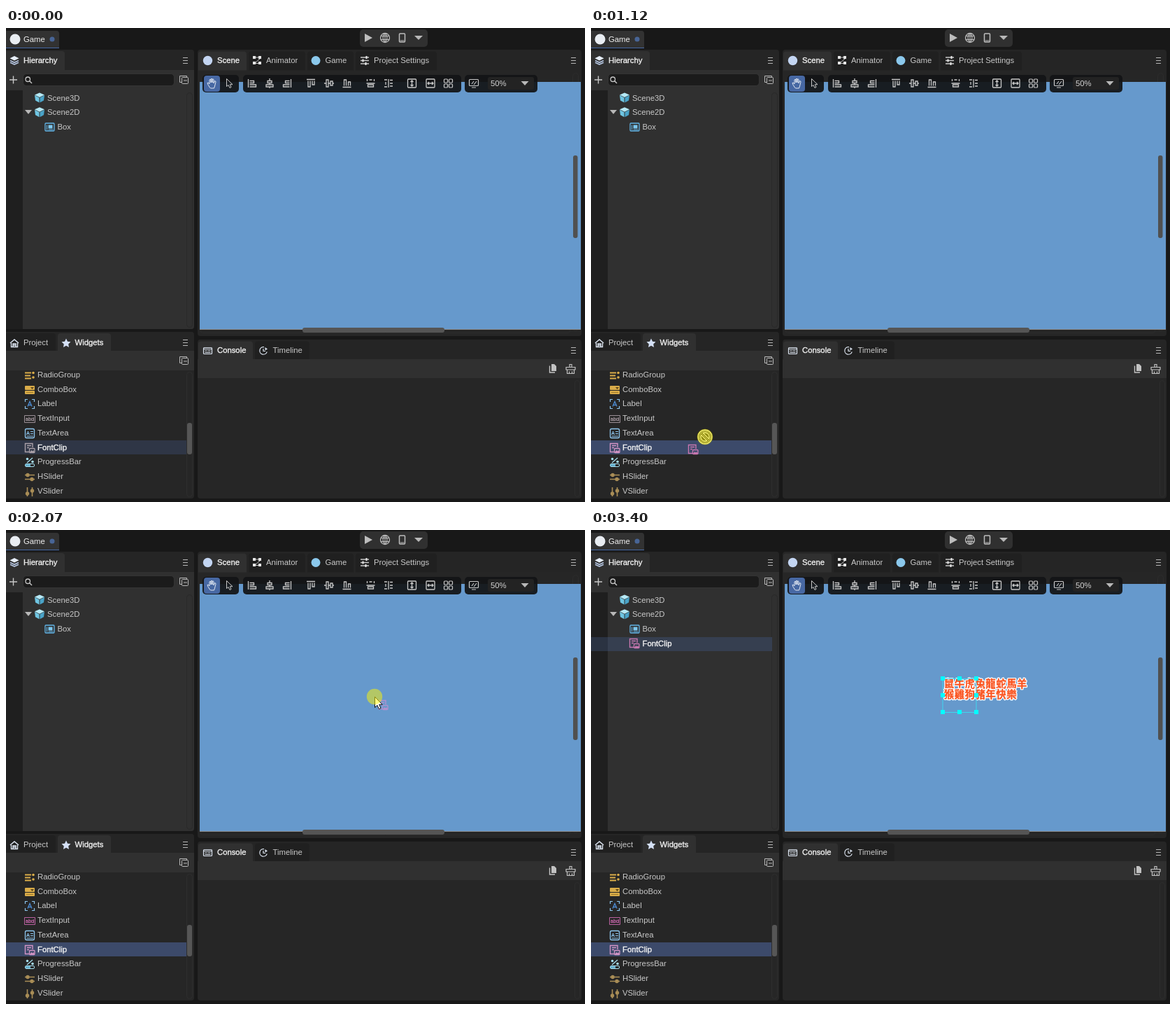
Write an HTML page with a canvas that moves like this. It is 828 px wide and 677 px high and loops after 3.72 s.

```html
<!DOCTYPE html>
<html lang="en">
<head>
<meta charset="utf-8">
<title>Editor: dragging a FontClip widget</title>
<style>
html, body { margin: 0; width: 100%; height: 100%; overflow: hidden; background: #181818; }
canvas { display: block; width: 828px; height: 677px; }
</style>
</head>
<body>
<canvas id="stage" width="828" height="677"></canvas>
<script>
const g = document.getElementById('stage').getContext('2d');
const LOOP = 3720;
const SANS = '"Liberation Sans", Arial, sans-serif';
const CJK = '"Noto Sans CJK TC", "Noto Sans CJK SC", "Noto Sans CJK JP", sans-serif';
const PANEL = '#303030', BAR = '#252525', DEEP = '#181818', LIST = '#262626';
const INK = '#c8c8c8', BLUE = '#6699cc', PINK = '#c877b0', GOLD = '#d9ac49', TAN = '#a98d56', SKY = '#8cc4ec';

// ---- drawing helpers ----
function box(x, y, w, h, color, r = 0) {
  g.fillStyle = color;
  g.beginPath();
  g.roundRect(x, y, w, h, r);
  g.fill();
}
function frame(x, y, w, h, color, r = 0, lw = 1) {
  g.strokeStyle = color;
  g.lineWidth = lw;
  g.beginPath();
  g.roundRect(x, y, w, h, r);
  g.stroke();
}
function disc(x, y, r, color) {
  g.fillStyle = color;
  g.beginPath();
  g.arc(x, y, r, 0, 7);
  g.fill();
}
function fill(x, y, d, color) {
  g.save();
  g.translate(x, y);
  g.fillStyle = color;
  g.fill(new Path2D(d));
  g.restore();
}
function line(x, y, d, color = INK, lw = 1) {
  g.save();
  g.translate(x, y);
  g.strokeStyle = color;
  g.lineWidth = lw;
  g.stroke(new Path2D(d));
  g.restore();
}
function label(s, x, y, color = INK, strong = false, size = 11.3) {
  g.font = size + 'px ' + SANS;
  g.fillStyle = color;
  g.fillText(s, x, y + 4);
  if (strong) {
    g.strokeStyle = color;
    g.lineWidth = .35;
    g.strokeText(s, x, y + 4);
  }
}
const menu = (x, y) => line(x, y, 'M-3 -3.5H4M-3 .5H4M-3 4.5H4', '#b8b8b8');
const down = (x, y, w = 5) => fill(x, y, `M${-w} -3H${w}L0 3Z`, '#b8b8b8');

// ---- icons ----
function cube(x, y) {
  fill(x, y, 'M0 -7L7 -4L0 -.5L-7 -4Z', '#b5e9f6');
  fill(x, y, 'M-7 -3.5L-.5 0V7L-6 4Z', '#6fc5e2');
  fill(x, y, 'M7 -3.5L.5 0V7L6 4Z', '#4aa3c8');
}
function boxIcon(x, y) {
  frame(x - 6.5, y - 5.5, 13, 11, '#62b5e8', 1, 1.3);
  box(x - 2, y - 3, 6, 5, '#7cc8f0');
  line(x, y, 'M-4 -3V4M-2 3.5H5', '#62b5e8');
}
function clipIcon(x, y, c) {
  line(x, y, 'M-1 5.5H-6.5V-6.5H4V-1M-4 -3.5H2M-4 -.5H-1', c, 1.4);
  frame(x - .5, y + 0.5, 7.5, 6, c, 1, 1.3);
  fill(x, y, 'M0 6L2.2 3L4 4.5L5.2 3L7 6Z', c);
}
function collapse(x, y) {
  line(x, y, 'M-3.5 3.5H-6.5V-5.5H3.5V-3.5', '#b8b8b8');
  frame(x - 3.5, y - 3.5, 9, 9, '#b8b8b8', 1);
  line(x, y, 'M-1 1H4', '#b8b8b8');
}
const icons = {
  RadioGroup(x, y) {
    line(x, y, 'M-7 -3.5H2M-7 .5H1M-7 4.5H2', GOLD, 2);
    disc(x + 5, y - 3.5, 1.8, GOLD);
    disc(x + 5, y + 3, 1.8, GOLD);
  },
  ComboBox(x, y) {
    box(x - 7, y - 6, 14, 6, GOLD, 1);
    box(x - 7, y + 1, 14, 5, GOLD, 1);
    fill(x, y, 'M1 -4H6L3.5 -1Z', '#5b4519');
    line(x, y, 'M-5 3.5H5', '#a27d2c');
  },
  Label(x, y) {
    line(x, y, 'M-6.5 -3V-6.5H-3M3 -6.5H6.5V-3M6.5 3V6.5H3M-3 6.5H-6.5V3', SKY, 1.2);
    line(x, y, 'M-3 3.5L0 -3.5L3 3.5M-2 1.5H2', '#4b8ad0', 1.3);
  },
  TextInput(x, y, lit) {
    const c = lit ? '#b9609f' : '#9b8f96';
    frame(x - 7.5, y - 4.5, 15, 10, c);
    label('abc', x - 6, y - .9, c, true, 7);
    line(x, y, 'M5.5 -2V3.5', c);
  },
  TextArea(x, y) {
    frame(x - 6.5, y - 6.5, 13, 13, SKY, 2, 1.3);
    line(x, y, 'M-4.5 2L-2.5 -3L-.5 2M-4 .5H-1M1 -2.5H5M1 .5H5M-4.5 4H5', SKY);
  },
  FontClip(x, y, lit) { clipIcon(x, y, lit ? '#d294c5' : '#aaa0a8'); },
  ProgressBar(x, y) {
    line(x, y, 'M-4 1L4 -6', '#a5dcec', 1.3);
    disc(x - 3.5, y - 4.5, 1.8, '#a5dcec');
    disc(x + 4, y - .5, 1.8, '#a5dcec');
    frame(x - 6.5, y + 2.5, 13, 4, '#a5dcec', 1.5);
    box(x - 6, y + 3, 7, 3, '#65aecb');
  },
  HSlider(x, y) {
    line(x, y, 'M-7 -2.5H7M-7 3.5H7', TAN, 1.6);
    disc(x - 3, y - 2.5, 2.7, TAN);
    disc(x + 3, y + 3.5, 2.7, TAN);
  },
  VSlider(x, y) {
    line(x, y, 'M-3.5 -6V7M3.5 -6V7', TAN, 1.6);
    disc(x - 3.5, y + 3, 2.7, TAN);
    disc(x + 3.5, y - 1, 2.7, TAN);
  }
};

// ---- timeline ----
const BURSTS = [[130, 630, 8], [910, 1390, 8], [1460, 1870, 7], [2070, 2550, 8], [2620, 3100, 8], [3170, 3400, 4]];
const KEYS = [
  [130, 305, 645], [340, 205, 632], [480, 105, 610], [630, 75, 598], [910, 75, 598], [980, 82, 597],
  [1050, 110, 594], [1182, 236, 565], [1252, 341, 517], [1321, 436, 438], [1390, 521, 360],
  [1460, 547, 310], [1530, 551, 284], [1665, 540, 250], [1870, 527, 238], [2070, 527, 238],
  [2300, 562, 272], [2550, 634, 361], [2620, 628, 377], [2760, 611, 430], [2900, 606, 471],
  [3030, 642, 558], [3100, 682, 613], [3247, 746, 648], [3323, 776, 664]
];

// time of the latest screen refresh; refreshes fall on whole 10 ms, hence the slack
function snap(t) {
  let last = 0;
  for (const [a, b, n] of BURSTS) {
    const gap = (b - a) / (n - 1);
    if (t >= a) last = a + gap * Math.min(n - 1, Math.floor((t - a + 5) / gap));
  }
  return last;
}
function slope(i, c) {
  if (i < 1 || i > KEYS.length - 2) return 0;
  const rate = k => (KEYS[k + 1][c] - KEYS[k][c]) / (KEYS[k + 1][0] - KEYS[k][0]);
  const a = rate(i - 1), b = rate(i);
  return a * b <= 0 ? 0 : 2 * a * b / (a + b);
}
function pointer(t) {
  t = Math.max(KEYS[0][0], Math.min(KEYS.at(-1)[0], t));
  let i = 0;
  while (i < KEYS.length - 2 && t > KEYS[i + 1][0]) i++;
  const h = KEYS[i + 1][0] - KEYS[i][0], u = (t - KEYS[i][0]) / h, v = 1 - u;
  return [1, 2].map(c =>
    KEYS[i][c] * (1 + 2 * u) * v * v + slope(i, c) * h * u * v * v +
    KEYS[i + 1][c] * u * u * (3 - 2 * u) - slope(i + 1, c) * h * u * u * v);
}

// ---- panels ----
function topBar() {
  box(0, 0, 828, 677, DEEP);
  box(0, 4, 76, 25, '#323232', [0, 4, 0, 0]);
  box(0, 28, 76, 1, '#4769a5');
  disc(13, 16, 7.5, '#e9edf2');
  label('Game', 25, 16, '#f0f0f0');
  disc(66, 16, 3.5, '#486596');
  box(506, 2, 97, 25, '#303030', 5);
  fill(518, 14, 'M-5 -6L6 0L-5 6Z', '#bdbdbd');
  frame(535.5, 7.5, 13, 13, '#bdbdbd', 6.5, 1.3);
  line(542, 14, 'M-6 -2.5H6M-6 2.5H6M0 -6V6M-1 -6Q-5 0 -1 6M1 -6Q5 0 1 6', '#bdbdbd', 1.1);
  frame(562.5, 8, 8, 12, '#bdbdbd', 1, 1.5);
  line(566.5, 18, 'M-3 0H3', '#bdbdbd');
  down(590, 14, 6);
}

function hierarchy(made) {
  box(0, 31, 269, 30, BAR, [0, 4, 0, 0]);
  box(0, 33, 84, 28, PANEL, [0, 4, 0, 0]);
  box(0, 60, 269, 370, PANEL, [0, 0, 4, 0]);
  box(0, 89, 24, 341, '#1f1f1f');
  fill(12, 46, 'M0 -6L6.5 -2.8L0 .5L-6.5 -2.8Z', '#e6edf8');
  line(12, 46, 'M-6 .5L0 3.3L6 .5M-6 3.2L0 6L6 3.2', '#b4c4df', 1.6);
  label('Hierarchy', 25, 46, '#f0f0f0', true);
  menu(256, 46);
  line(10, 74, 'M-5 0H6M.5 -5.5V5.5', INK, 1.4);
  box(25, 66, 215, 16, '#1b1b1b', 4);
  frame(24.5, 65.5, 216, 17, '#343434', 4);
  frame(28, 70, 6.5, 6.5, INK, 3.25, 1.3);
  line(34, 76, 'M-.5 -.5L3 3', INK, 1.4);
  collapse(255, 74);
  frame(258.5, 92.5, 8, 335, '#292929', 4);
  if (made) {
    box(0, 153, 259, 20, '#363f50');
    box(0, 153, 24, 20, '#2b3342');
    clipIcon(62, 162, PINK);
    label('FontClip', 73.5, 161.7, '#f4f4f4', true);
  }
  cube(48, 99.5);
  label('Scene3D', 59, 99.5);
  down(32, 120);
  cube(48, 120.3);
  label('Scene2D', 59, 120.3);
  boxIcon(62.5, 141.5);
  label('Box', 73.5, 141);
}

const ROW = 20.7, TOP = 484.7;
const NAMES = Object.keys(icons);

function widgets(hover, t) {
  box(0, 434, 269, 28, BAR, [0, 4, 0, 0]);
  box(0, 436, 71, 25, '#202020', [0, 4, 0, 0]);
  box(74, 436, 76, 26, PANEL, [4, 4, 0, 0]);
  box(0, 461, 269, 28, PANEL);
  box(0, 489, 269, 183, LIST, [0, 0, 4, 0]);
  line(12, 450, 'M-6 0L0 -5L6 0', '#dce4f0', 1.6);
  line(12, 450, 'M-4.5 0V5.5H4.5V0M-2 5V1H2V5M-2 3H2', '#dce4f0', 1.4);
  label('Project', 25, 448.7);
  fill(86, 450, 'M0 -6.5L2 -2.2L6.5 -1.7L3.2 1.5L4 6L0 3.8L-4 6L-3.2 1.5L-6.5 -1.7L-2 -2.2Z', '#d4e0f6');
  label('Widgets', 98.5, 448.7, '#f0f0f0', true);
  menu(256, 449);
  collapse(255, 475);
  g.save();
  g.beginPath();
  g.rect(0, 489.5, 269, 182);
  g.clip();
  NAMES.forEach((name, i) => {
    const y = TOP + ROW * (i + .5), picked = name === 'FontClip';
    const band = picked ? (t >= 970 ? '#3c4a6a' : '#2f3646') : i === hover ? '#2d3239' : null;
    if (band) box(0, Math.round(y - 9.2), 259, 20, band);
    icons[name](34, Math.round(y + 1), picked ? t >= 970 : t >= 1170);
    label(name, 45, y, picked ? '#f4f4f4' : INK, picked);
  });
  g.restore();
  frame(258.5, 491.5, 8, 178, '#2e2e2e', 4);
  box(259, 564, 7, 45, '#565656', 3);
}

function tab(x, w, y, text, tx, on) {
  box(x, y, w, 27, on ? PANEL : '#202020', [4, 4, 0, 0]);
  label(text, tx, y + 12.5, on ? '#f0f0f0' : INK, on);
}

function sceneTabs() {
  box(274, 31, 549, 30, BAR, [4, 4, 0, 0]);
  box(274, 60, 549, 380, LIST, [0, 0, 4, 4]);
  tab(275, 69, 33.5, 'Scene', 302, true);
  tab(347, 81, 33.5, 'Animator', 372, false);
  tab(431, 66, 33.5, 'Game', 456.5, false);
  tab(500, 116, 33.5, 'Project Settings', 526, false);
  disc(288.5, 46.5, 6.7, '#c3d5f2');
  line(359, 46, 'M-3 -4H3M4 -2L-3 4M-2 4.5H3', INK);
  for (const [x, y] of [[353, 40], [361, 40], [353, 48], [361, 48]]) box(x, y, 4, 4, '#e6e6e6');
  disc(443, 46.5, 6.5, '#8bc8ec');
  line(513, 46, 'M-6 -4H6M-6 .5H6M-6 5H6', INK, 1.3);
  line(513, 46, 'M2.5 -6V-2M-2.5 -1.5V2.5M1.5 3V7', '#e6e6e6', 2);
  menu(811, 46);
}

function toolbar() {
  for (const [x, w] of [[281, 52], [339, 312], [656, 104]]) box(x, 67, w, 25, 'rgba(19,20,22,.93)', 5);
  box(283, 68, 23, 23, '#4768a3', 4);
  line(294.5, 79, 'M-3 6Q-6 2 -6.5 -.5Q-5.5 -2 -3.5 1V-5Q-2.5 -6.5 -1.5 -5V-1V-6Q-.5 -7.5 .5 -6V-1V-5.5Q1.5 -7 2.5 -5.5V0L3.5 -3Q5.5 -4 5.5 -2L4 4L3 7H-2Z', '#e2e8f2');
  line(319.5, 79, 'M-4 -6.5V4.5L-1.5 2.5L.5 6.5L2.5 5.5L.8 1.7H4.5Z', INK);
  const paint = (x, d, lw = 1.3) => line(x, 79, d, INK, lw);
  paint(351.5, 'M-5 -6V6M-3 -3.5H3V-.5H-3M-3 2H6V5H-3');
  paint(377, 'M0 -7V-4M0 0V2M0 5V7M-3 -3.5H3V-.5H-3ZM-5 2H5V5H-5Z');
  paint(402.5, 'M5 -6V6M3 -3.5H-3V-.5H3M3 2H-6V5H3');
  paint(436, 'M-6 -5.5H6M-4 -3.5V5H-1V-3.5M2 -3.5V2H5V-3.5');
  paint(462, 'M-7 0H-4M-1 0H2M5 0H7M-4 -5V5H-1V-5ZM2 -3V3H5V-3Z');
  paint(487.5, 'M-6 5.5H6M-4 3.5V-5H-1V3.5M2 3.5V-2H5V3.5');
  paint(521.5, 'M-5 -6V-3M5 -6V-3M-2 -5H2M-6 0H6M-4 2H4V5H-4Z');
  paint(547, 'M-6 -5H-2M-6 5H-2M-4 -2V2M0 -6V6M2 -4.5H6M2 4H6M2 0H6');
  frame(574.5, 73, 12, 12, INK, 1, 1.3);
  paint(580.5, 'M0 -4V4M-2 -2L0 -4L2 -2M-2 2L0 4L2 2');
  frame(601, 73, 12, 12, INK, 1, 1.3);
  paint(607, 'M-4 0H4M-2 -2L-4 0L-2 2M2 -2L4 0L2 2');
  for (const x of [626.5, 633.5]) for (const y of [73, 80]) frame(x, y, 5, 5, INK, 1, 1.2);
  frame(662.5, 73.5, 13, 9, INK, 1, 1.2);
  paint(669, 'M-3 6H3M-3 1L0 -3M0 2L4 -3', 1.1);
  box(689, 70, 66, 18, '#232323', 3);
  label('50%', 693, 79, '#d4d4d4');
  down(742, 79, 5.5);
}

function selection() {
  g.textAlign = 'center';
  g.lineJoin = 'round';
  g.font = '900 14.5px ' + CJK;
  ['鼠牛虎兔龍蛇馬羊', '猴雞狗豬年快樂'].forEach((row, r) => {
    [...row].forEach((ch, i) => {
      const x = 512 + 14.9 * i, y = 225 + 15 * r;
      g.strokeStyle = '#fff';
      g.lineWidth = 3;
      g.strokeText(ch, x, y);
      g.fillStyle = g.strokeStyle = '#fa5420';
      g.lineWidth = .3;
      g.fillText(ch, x, y);
      g.strokeText(ch, x, y);
    });
  });
  g.textAlign = 'left';
  g.lineJoin = 'miter';
  frame(503, 212.5, 48, 48, '#3fd6f0');
  for (const x of [503, 527, 551])
    for (const y of [212, 236, 260])
      if (x !== 527 || y !== 236) box(x - 3, y - 3, 6, 6, '#00ffff');
}

function scene(made) {
  sceneTabs();
  frame(810.5, 64.5, 8, 368, '#2c2c2c', 4);
  frame(278.5, 428.5, 528, 7, '#2c2c2c', 3);
  box(277, 77, 545, 353, BLUE);
  box(277, 430, 545, 1, '#8b8b8b');
  box(424, 428, 203, 7, '#555', 3);
  box(811, 182, 6.5, 118, '#505050', 3);
  if (made) selection();
  toolbar();
}

function consolePanel() {
  box(274, 445, 549, 29, BAR, [4, 4, 0, 0]);
  tab(275, 78, 447.5, 'Console', 302, true);
  tab(356, 78, 447.5, 'Timeline', 381.5, false);
  box(274, 473, 549, 27, PANEL);
  box(274, 500, 549, 172, LIST, [0, 0, 4, 4]);
  frame(282.5, 456.5, 12, 9, '#dce4f0', 1, 1.2);
  line(288.5, 461, 'M-6 -2.5H6M-4 0H-1M0 0H4M-4 2.5H4', '#dce4f0');
  line(368, 461, 'M1 -5.3A5.3 5.3 0 1 0 5.2 1.5M0 -3V.5H3', '#dce4f0', 1.2);
  fill(368, 461, 'M2.5 -5L6 -2.5L2.5 -.5Z', '#dce4f0');
  menu(811, 460);
  fill(782, 486, 'M-2 -6H2L5 -3V4H-2Z', '#c2c2c2');
  line(782, 486, 'M-4.5 -3.5V6H3', '#c2c2c2', 1.4);
  line(807.5, 487, 'M-1.5 -3V-6.5H1.5V-3M-6.5 1V-2.5H6.5V1ZM-5 1V6.5H5V1M-2 6V3.5M2 6V3.5', '#c2c2c2', 1.2);
  frame(813.5, 503.5, 7, 166, '#2d2d2d', 4);
}

// ---- pointer shapes ----
function arrow(x, y) {
  const d = 'M.5 .3V15.5L4 12.3L6.4 17.7L9 16.6L6.6 11.3H11.2Z';
  fill(x, y, d, '#fff');
  line(x, y, d, '#000', .9);
}
function noDrop(x, y) {
  for (const [c, w] of [['#fff', 5], ['#000', 2.6], ['#fff', .8]]) {
    frame(x - 8, y - 8, 16, 16, c, 8, w);
    line(x, y, 'M-5.5 -5.5L5.5 5.5', c, w);
  }
}
function copyMark(x, y) {
  g.setLineDash([1.5, 1.5]);
  line(x, y, 'M4 13L8 20M7 12L11 17M5 15H14M6 18H13', '#222');
  g.setLineDash([]);
  box(x + 9, y + 18, 11, 11, '#fff');
  frame(x + 9.5, y + 18.5, 10, 10, '#000');
  line(x + 14.5, y + 23.5, 'M-3 0H3M0 -3V3', '#000', 1.3);
}
function mouse(t) {
  const [x, y] = pointer(t).map(Math.round);
  const held = t >= 905 && t < 2100, dragging = t >= 1040 && held;
  const inScene = x > 276 && y < 430;
  if (dragging) {
    const [lx, ly] = pointer(t - 32);
    g.globalAlpha = inScene ? .7 : 1;
    clipIcon(Math.round(lx + 12), Math.round(ly + 12), inScene ? '#d08fd0' : PINK);
    g.globalAlpha = 1;
  }
  if (dragging && !inScene) noDrop(x, y);
  else {
    arrow(x, y);
    if (dragging && t < 2060) copyMark(x, y - 1);
  }
  if (held) disc(x, y, 11.2, 'rgba(255,245,0,.5)');
}

function draw(now) {
  const t = snap(now % LOOP), made = t >= 2130;
  const seen = t >= 130 && t < 3399;
  const [hx, hy] = pointer(t - 68);
  const hover = seen && hx < 258 ? Math.floor((hy - TOP) / ROW) : -1;
  topBar();
  hierarchy(made);
  widgets(hover, t);
  scene(made);
  consolePanel();
  if (seen) mouse(t);
}

const start = performance.now();
function tick() {
  draw(performance.now() - start);
  requestAnimationFrame(tick);
}
tick();
</script>
</body>
</html>
```
